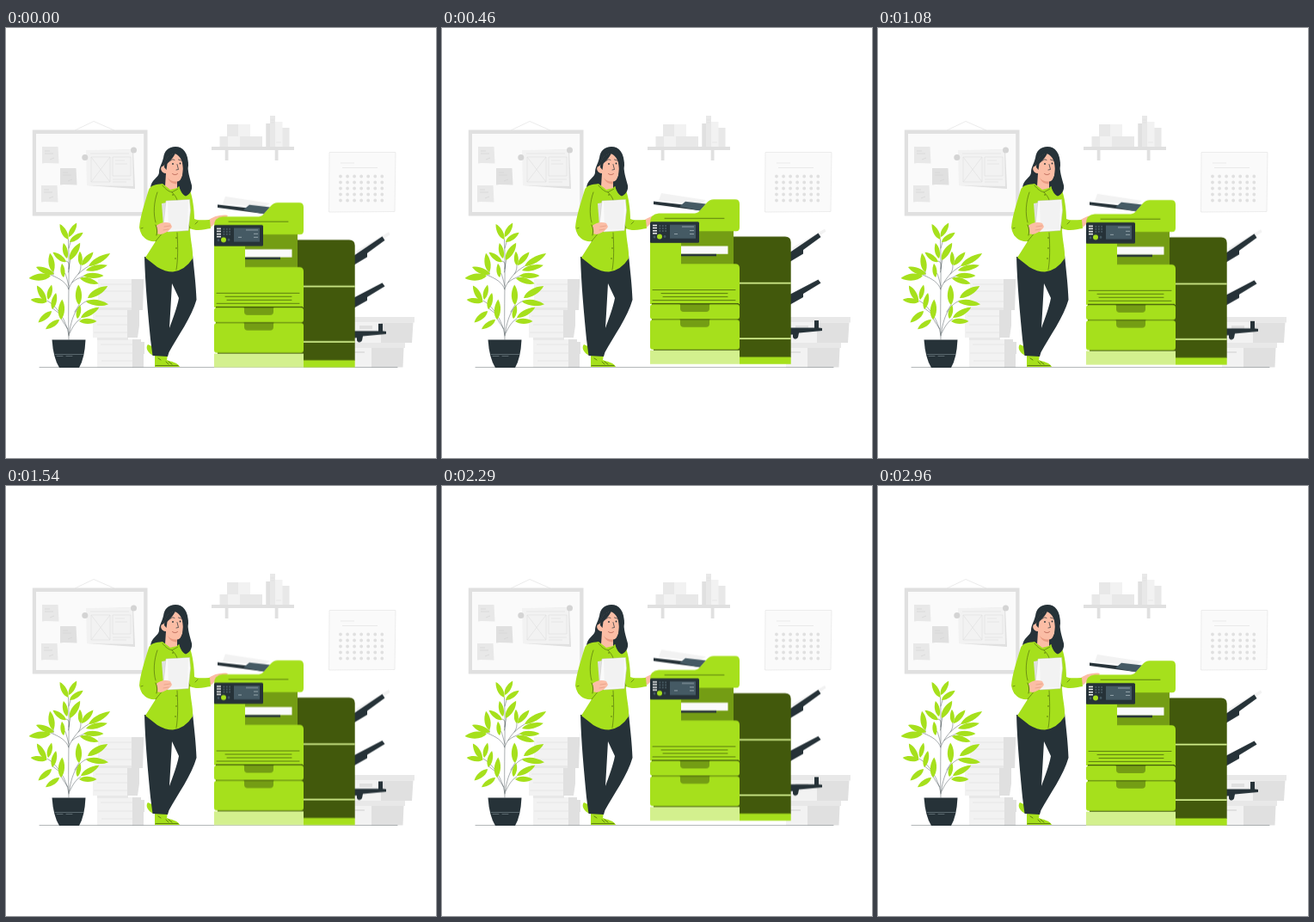
An HTML page without scripts that plays this animation: 500x500 px, repeating every 3000 ms.

```html
<!DOCTYPE html>
<html lang="en">
<head>
<meta charset="utf-8">
<title>Office printer</title>
<style>
html, body { margin: 0; width: 100%; height: 100%; overflow: hidden; background: #fff; }
svg { display: block; width: 100vw; height: 100vh; }
.lime { fill: #a6e01c; }
.moss { fill: #749d14; }
.deep { fill: #42590c; }
.pale { fill: #d3f08e; }
.ink { fill: #263238; }
.slate { fill: #455a64; }
.skin { fill: #fbbda5; }
.g1 { fill: #fafafa; }
.g2 { fill: #f2f2f2; }
.g3 { fill: #e8e8e8; }
.g4 { fill: #e0e0e0; }
.line { fill: none; stroke: #263238; stroke-width: .7; stroke-linecap: round; stroke-linejoin: round; }
.thin { fill: none; stroke: #dedede; stroke-width: .6; }
.seam { fill: none; stroke: #3f560c; stroke-width: .7; stroke-linecap: round; }
.float { animation: float 1.5s -.025s linear infinite; }
@keyframes float { 50% { transform: translateY(-6.1px); } }
</style>
</head>
<body>
<svg viewBox="0 0 500 500">
<defs>
  <path id="leaf" d="M0 0C4-4.2 13-4.6 20.500 0C15 4 5 4 0 0Z"/>
  <g id="note"><path d="M0 0H18.5L19.5 19.5L4 19L0 19.5Z"/><path class="thin" style="stroke:#d2d2d2" d="M3 5H9M3 8H13M9 15L14 13"/></g>
  <path id="days" d="M389 0H438" fill="none" stroke="#e0e0e0" stroke-width="3.8" stroke-linecap="round" stroke-dasharray="0 8.05"/>
</defs>

<!-- Pinboard -->
<path class="thin" d="M80 119L102 108.500L126 119"/>
<path class="g4" d="M30.800 118.500H164.500V218.500H30.800Z"/>
<path class="g1" d="M35 123H160.200V214H35Z"/>
<use href="#note" class="g3" x="42" y="138"/>
<use href="#note" class="g4" x="63" y="163"/>
<use href="#note" class="g3" x="41" y="183"/>
<path class="g4" d="M95 143L148 141L150 187L94 183Z"/>
<path class="g2" d="M93 142L147 141L148 184L94 183Z"/>
<path class="thin" d="M99 150H121V179H99ZM99 150L121 179M121 150L99 179M124 150H145V172H124ZM127 154H138M127 158H141M124 176H145M124 179H140M98 146H143"/>
<g fill="#d4d4d4"><circle cx="91.800" cy="150.500" r="3.500"/><circle cx="148.500" cy="142" r="3.500"/></g>

<!-- Shelf -->
<path class="g4" d="M239 138H335V142H239ZM254.700 142H258.500V154H254.700ZM312.700 142H316.500V154H312.700Z"/>
<path class="g3" d="M257 112H270V126H257ZM248.500 126H258V138H248.500ZM272 126H298V138H272Z"/>
<path class="g2" d="M270 112H284V126H270ZM258 126H272V138H258Z"/>
<path class="g4" d="M302.300 111H307.500V138H302.300Z"/>
<path class="g3" d="M307 102H313V138H307ZM321 116H329.500V138H321Z"/>
<path class="g2" d="M313 109H321.500V138H313Z"/>
<path class="thin" d="M308 107H312M308 110H312M314 133H320"/>

<!-- Calendar -->
<path class="g1" d="M376 144.500L453 144.500L452 213.500L375.500 214Z" stroke="#e9e9e9" stroke-width=".8"/>
<path class="thin" d="M389 157H405M391 162.500H432"/>
<use href="#days" y="172.500"/><use href="#days" y="179.500"/><use href="#days" y="186.500"/><use href="#days" y="193.500"/><use href="#days" y="200.500"/>

<!-- Paper stacks -->
<path class="g2" d="M107 292H147V328H107ZM101 328H142V360H101ZM106 362H148V394.500H106Z"/>
<path class="g3" d="M104 325H147V328H104ZM106 360H142V363H106Z"/>
<path class="g4" d="M146 292H160V300L159 328H146ZM141 328H155V346L153 360H141ZM147 362H157V365H161V379H160V394.500H147Z"/>
<path class="thin" d="M110 298H146M108 306H146M111 318H146M104 335H141M106 345H141M102 354H141M110 368H147M107 378H147M111 387H147"/>
<path class="g2" d="M400 343H436V366H400ZM400 372H425V394.500H400Z"/>
<path class="g3" d="M400 336H475V342.500H400ZM400 366H464V372H400Z"/>
<path class="g4" d="M436 342.500H473.500L472 366H436ZM425 372H462.500L461.500 394.500H425ZM411 346H426V350H411Z"/>
<path class="g4" d="M405 376H417V378H405Z"/>

<path class="line" stroke-opacity=".5" d="M39 394.500H455"/>

<!-- Plant -->
<path class="line" style="stroke-width:.5" stroke-opacity=".8" d="M73 362C72 330 74 280 72.500 246M73 304C70 296 64 292 52 287M73 300C70 288 68 280 67 288M72.500 284C74 276 74 272 70 271M73 303C78 292 84 284 96 277M77 296C82 291 86 291 91 288M84 286C87 282 87 279 87 275M73 280L75 268M73 256L75 249M73 357C70 340 60 324 48 317M72 350C67 343 65 340 64 337M62 332C58 329 56 327 54 326M73 358C76 336 82 322 95 317M80 330L85 322M74 355C78 346 82 341 87 338M55 287V283"/>
<g class="lime">
  <use href="#leaf" transform="translate(72.500 246)rotate(-119)"/>
  <use href="#leaf" transform="translate(73 243)rotate(-61)scale(.92)"/>
  <use href="#leaf" transform="translate(74 249)rotate(-36)scale(.94)"/>
  <use href="#leaf" transform="translate(70 272)rotate(-144)scale(.94)"/>
  <use href="#leaf" transform="translate(71 268)rotate(-103)scale(.9)"/>
  <use href="#leaf" transform="translate(74 270)rotate(-59)scale(1.150)"/>
  <use href="#leaf" transform="translate(55 284)rotate(-100)scale(1.100)"/>
  <use href="#leaf" transform="translate(67 290)rotate(-97)scale(.8)"/>
  <use href="#leaf" transform="translate(56 286)rotate(-159)scale(1.100)"/>
  <use href="#leaf" transform="translate(52 288)rotate(173)scale(1.250)"/>
  <use href="#leaf" transform="translate(87 276)rotate(-94)scale(.8)"/>
  <use href="#leaf" transform="translate(88 276)rotate(-49)"/>
  <use href="#leaf" transform="translate(96 277)rotate(-31)scale(1.430 1.100)"/>
  <use href="#leaf" transform="translate(93 282)rotate(-14)scale(1.250 1)"/>
  <use href="#leaf" transform="translate(90 288)scale(1.150 1)"/>
  <use href="#leaf" transform="translate(86 291)rotate(16)scale(1.100 1)"/>
  <use href="#leaf" transform="translate(47 318)rotate(-121)scale(1.050)"/>
  <use href="#leaf" transform="translate(49 316)rotate(-77)scale(.87)"/>
  <use href="#leaf" transform="translate(48 318)rotate(-174)scale(.95)"/>
  <use href="#leaf" transform="translate(54 327)rotate(-78)scale(.95)"/>
  <use href="#leaf" transform="translate(53 329)rotate(139)"/>
  <use href="#leaf" transform="translate(64 339)rotate(-87)scale(1.150)"/>
  <use href="#leaf" transform="translate(62 339)rotate(145)scale(.95)"/>
  <use href="#leaf" transform="translate(85 322)rotate(-92)scale(1.150)"/>
  <use href="#leaf" transform="translate(95 314)rotate(-31)scale(1.320 1.200)"/>
  <use href="#leaf" transform="translate(93 318)rotate(7)scale(1.280 1.100)"/>
  <use href="#leaf" transform="translate(83 338)rotate(-79)scale(.8)"/>
  <use href="#leaf" transform="translate(87 337)rotate(-30)scale(1.200 1.050)"/>
  <use href="#leaf" transform="translate(85 341)"/>
</g>
<path class="ink" d="M53.500 362.500H92.500Q91.500 384 85 395H62Q55 384 53.500 362.500Z"/>
<path class="line" style="stroke:#91a0a6;stroke-width:.5" d="M57 379.500H89.500M59 381.500H66M70 381.500H77"/>

<!-- Woman -->
<path class="lime" d="M165 368C162 371 164 378 172 381L174 372ZM173 379L188 380L187 386C192 388 200 389 202 394H173Z"/>
<path class="seam" d="M174 392.500H200M177 384L180 386M186 388L189 391M189 388L193 391"/>
<path class="ink" d="M161 266C162 300 165 330 168 362L170.500 381L188 382L189.500 377C200 358 216 336 221.500 316C221 300 219 284 217 264ZM193 297C192 315 191 332 190 349C194 338 199 325 201 314Z" fill-rule="evenodd"/>
<path class="ink" d="M197 138C189 138 184 143 183 151C181 159 178 162 178 168C178 174 168 176 168 187L186 190L204 186L212 160C212 145 206 138 197 138Z"/>
<path class="skin" d="M185 158C186 150 191 147 196 146C203 148 206.500 157 206 165C205.500 174 203 178 199 178.500V187L192 190L185 184L186 169C180 169 178 161 183 160.500Z"/>
<path class="ink" d="M184 162C184 152 190 146 197 145.500C194 152 190 155 187.500 158L186.500 165Z"/>
<path d="M188 174C191 178 195 179 199 178.500L198.500 181.500C193 181 190 179 188 174Z" fill="#e99b83"/>
<path class="line" d="M191 154.500C193 152.500 194 152.500 196 153.500M200.500 153L203.500 154M199 158.500L200.500 164.500L198 165"/>
<path class="line" style="stroke:#a94f43" d="M193.500 169.500C195.500 171 197.500 171 199.500 169.500"/>
<circle class="ink" cx="194" cy="158" r=".9"/><circle class="ink" cx="202.500" cy="157.500" r=".9"/>
<path class="skin" d="M234 224C241 219 248 217 256 217.500C259 218 258 220 254 220.500L246 224L239 231L235 232Z"/>
<path class="lime" d="M182 181C174 182 168 183 166 188C161 204 156 220 155 232C157 245 167 249 174 248L162 267L176 278Q185 283.500 194 283.500Q208 282 217 268C218 258 214 246 214 233C222 237 231 234 238 233L237 223C230 223 222 224 219 222C219 211 217 197 214 189C211 186 206 185 201 184L199 186L191 188Z"/>
<path class="seam" stroke-opacity=".8" d="M182 183C186 188 189 190 193 191L200 187M193 191C198 196 200 200 200 207M199 238C200 255 200 270 198 281M174 248C177 244 180 241 182 238M176 191C172 202 171 216 174 226M214 233L211 226M157 233L164 231M223 225L220 228"/>
<g class="deep"><circle cx="194" cy="194" r=".7"/><circle cx="198" cy="244" r=".7"/><circle cx="198" cy="256" r=".7"/><circle cx="197" cy="268" r=".7"/></g>
<path class="ink" d="M199 144C205 150 207 160 205 172C202 178 200 183 203 189C205 193 207 195 209 195.500C213 194 217 189 216 183C214 175 211 168 211.500 156Z"/>
<path class="g4" d="M181 204L187 203L191 233L183 230Z"/>
<path class="g1" d="M186 201L213.500 199.500L214.500 212L212 235.500L188 237L183 229Z" stroke="#c9c9c9" stroke-width=".5"/>
<path class="g2" d="M188 202L212 201L211 234L189 235Z"/>
<path class="skin" d="M174 231C178 226 186 225 191 227L193 231C191 235 187 238 180 240L175 239Z"/>
<path class="line" style="stroke:#d98d74;stroke-width:.5" d="M184 231L191 230M183 235L189 234"/>
<path class="lime" d="M160 229L174 229C176 232 177 237 176 240L170 247L158 241Z"/>
<path class="seam" d="M174 229C176 233 176 237 175 241"/>

<!-- Printer -->
<g class="float">
  <path class="g2" d="M407 259.500L445 237.500L446.500 240.500L409 265.500Z"/>
  <path class="ink" d="M405 264.500L437.500 242.500L440.500 247L420 262V266.500L405 275.500ZM405 313.500L437.500 296.500L440.500 300.500L420 313V317L405 325.500ZM405 352.500H433V344H438V352.500L442 353V356L415 358.500L414 363.500C412 366.500 409 366 408 363.500V360.500H405Z"/>

  <path class="deep" d="M339 246.400H399Q405.700 246.400 405.700 253V387H339Z"/>
  <path class="pale" d="M346 299.800H405.700V301.600H346ZM346 364.300H405.700V366.100H346Z"/>
  <path class="lime" d="M346 386.500H405.700V394.700H346Z"/>

  <path class="g2" d="M255 196L307 204L300 209L252 204.500Z"/>
  <path class="ink" d="M246 205.500L277 209L301 212L298 216L246 209Z"/>
  <path class="slate" d="M276 211.500L283 205.700L307 208.500L300 216.500Z"/>
  <path class="moss" d="M277 238H339V280H277Z"/>
  <path d="M278 257.400H332.500V266.800H278Z" fill="#fafafa"/>
  <path class="ink" d="M278 266.800H319V269.200H278Z"/>

  <path class="lime" d="M242 230Q242 220.500 252 219.500H294Q298 219 301 215L308 207Q311 203.200 316 203.200H341Q346 203.200 346 208.500V236Q346 240.200 342 240.200H278V278.200H341Q346 278.200 346 283V325H242Z"/>
  <path class="seam" d="M259 225.300H328"/>
  <path class="moss" d="M242 252.500H278V254H242Z"/>
  <path class="seam" d="M245 308.500H341M255 312.500H332M257 316.500H332M245 320.500H341"/>

  <rect class="ink" x="242" y="229.200" width="57" height="24.500" rx="1.500"/>
  <rect class="slate" x="265" y="232.700" width="30" height="16"/>
  <path d="M245 233.500H250M245 236.600H250M245 239.700H250M245 242.800H250" stroke="#f2f2f2" stroke-width="1.500"/>
  <path d="M252.500 234H261M252.500 237H261M252.500 240H261" stroke="#52666f" stroke-width="1.600" stroke-dasharray="1.800 1.600"/>
  <path d="M279 235H293M288 239.500H293M270 243.500H274M288 243.500H293" stroke="#a9b8be" stroke-width=".8"/>
  <circle class="lime" cx="253" cy="246.500" r="3"/>
  <circle class="slate" cx="247" cy="247" r="1.400"/><circle class="slate" cx="259" cy="246.500" r="1.400"/>

  <path class="deep" d="M244 324H345V326H244ZM244 341.700H345V344H244ZM246 376H346V379.500H246Z"/>
  <rect class="lime" x="242" y="325.200" width="104" height="17.300" rx="3"/>
  <rect class="lime" x="242" y="343.200" width="104" height="34.500" rx="3"/>
  <path id="grip" class="moss" d="M277 325.200H311V330Q311 334 307 334H281Q277 334 277 330Z"/>
  <use href="#grip" y="17.700"/>
  <path class="seam" d="M277 325.200H311M277 343H311"/>
  <path class="pale" d="M242 378.700H346V394.700H242Z"/>
</g>
</svg>
</body>
</html>
```
